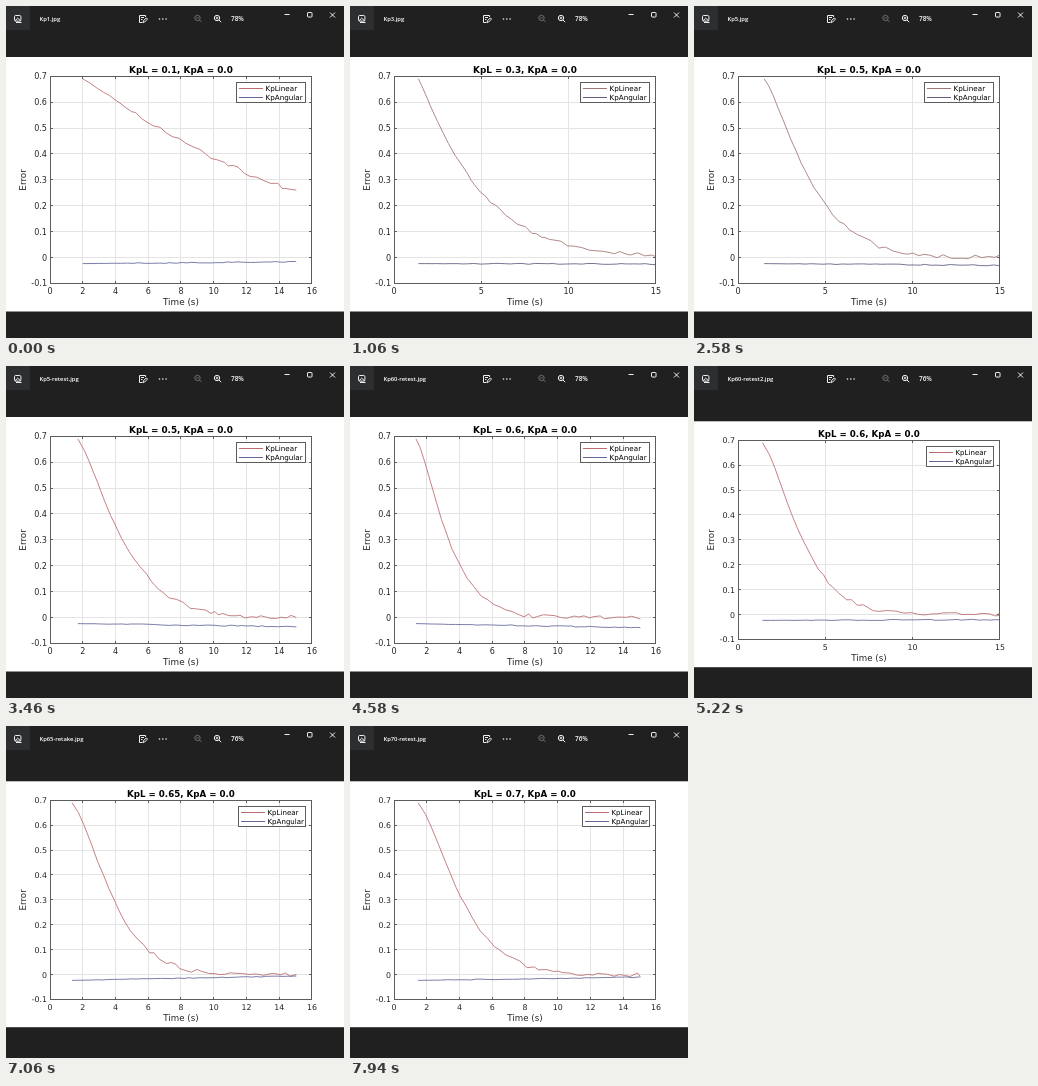
Write an HTML page that moves like this. It is 338 px wide and 332 px high and loops after 8000 ms.

```html
<!DOCTYPE html>
<html lang="en">
<head>
<meta charset="utf-8">
<title>Gain tuning plots</title>
<style>
  html, body { margin: 0; width: 100%; height: 100%; overflow: hidden; background: #202020; }
  svg { display: block; width: 338px; height: 332px; }
  .ui { font: 600 5.85px "Open Sans", sans-serif; fill: #fff; }
  .icon { fill: none; stroke: #f0f0f0; }
  .plot { font-family: "DejaVu Sans", sans-serif; fill: #262626; }
  .slide { visibility: hidden; }
  .slide.on { visibility: visible; }
  .grid, .axis, .key { fill: none; shape-rendering: crispEdges; }
  .grid { stroke: #e4e4e4; }
  .axis { stroke: #5c5c5c; }
  .line { fill: none; stroke-width: .85; stroke-linejoin: round; }
  .lin { stroke: #bb6c70; }
  .ang { stroke: #64679a; }
  .loading .lin { stroke: #a07773; }
  .loading .ang { stroke: #5c5f80; }
</style>
</head>
<body>
<svg id="stage" viewBox="0 0 338 332">
  <rect width="338" height="332" fill="#202020"/>
  <rect width="24" height="24" fill="#2d2e30"/>
  <g class="icon">
    <rect x="8.5" y="9.5" width="6.4" height="5.6" rx="1.2"/>
    <path d="M9 14.8l2.7-2.6 2.8 2.6M10 16.5h5.5"/>
    <path d="M139.5 11V9.5h-6v7h3M135 11.5h3M135 13.5h1.5M137 16.5l.4-1.7 2.9-2.9 1.2 1.2-2.9 2.9z"/>
    <g stroke="#6c6c6c"><circle cx="191.5" cy="12" r="2.7"/><path d="M193.5 14l2.2 2.2M190.2 12h2.6"/></g>
    <circle cx="211" cy="12" r="2.7"/><path d="M213 14l2.2 2.2M209.7 12h2.6M211 10.7v2.6"/>
    <path d="M278.5 8.5h5M324 6.5l5 5M329 6.5l-5 5"/>
    <rect x="301.5" y="6.5" width="4.5" height="4.5" rx=".6"/>
  </g>
  <g fill="#f0f0f0"><circle cx="153.5" cy="13" r=".8"/><circle cx="156.8" cy="13" r=".8"/><circle cx="160.1" cy="13" r=".8"/></g>
</svg>
<script>
const LOOP = 8000, SETTLE = 160, LEFT = 44, RIGHT = 305.9;

// Two picture sizes: the second is fitted a little smaller in the window.
const BIG = { zoom: '78%', top: 51, bottom: 305.5, y0: 70.2, dy: 25.92, font: 1, legend: [230, 76, 70, 21] };
const SMALL = { zoom: '76%', top: 55.3, bottom: 301.2, y0: 74.2, dy: 24.92, font: .98, legend: [232, 80, 68, 21] };

// name, time shown, first sample (s), decay rate, decay bend, last angular error, picture size, last tick
const slides = [
  ['Kp1', 0, 2, .0766, 1.1, -.016, BIG, 16],
  ['Kp2', 500, 1.6, .17, 1.1, -.02, BIG, 16],
  ['Kp3', 980, 1.4, .28, 1.1, -.025, BIG, 15],
  ['Kp4', 1620, 1.34, .378, 1.07, -.035, BIG, 16],
  ['Kp4-retest', 2100, 1.4, .38, 1.1, -.03, BIG, 16],
  ['Kp5', 2580, 1.5, .33, 1.3, -.03, BIG, 15],
  ['Kp5-retest', 3220, 1.7, .317, 1.31, -.035, BIG, 16],
  ['Kp60', 3860, 1.4, .42, 1.35, -.035, BIG, 15],
  ['Kp60-retest', 4420, 1.34, .437, 1.36, -.039, BIG, 16],
  ['Kp60-retest2', 4980, 1.4, .38, 1.4, -.02, SMALL, 15],
  ['Kp60-retest3', 5540, 1.4, .37, 1.4, -.02, SMALL, 16],
  ['Kp65', 6020, 1.47, .328, 1.46, -.014, SMALL, 16],
  ['Kp65-retake', 6580, 1.34, .342, 1.42, -.005, SMALL, 16],
  ['Kp70', 7140, 1.47, .325, 1.4, -.015, BIG, 16],
  ['Kp70-retest', 7780, 1.47, .325, 1.4, -.01, SMALL, 16]
].map(([name, at, from, rate, bend, drift, fit, max]) => ({
  name, at, from, rate, bend, drift, fit, max,
  to: Math.min(15.05, max - .05),
  gain: Number('0.' + name.match(/\d+/)[0])
}));

function random(seed) {
  let s = seed * 7919 + 17;
  return () => (s = (s * 16807) % 2147483647) / 2147483647;
}

// Samples an error function at uneven times, with sensor noise that grows in.
function trace({ from, to, fit, max }, error, noise, seed) {
  const rnd = random(seed), pts = [];
  for (let t = from; ; t = Math.min(to, t + .22 + rnd() * .26)) {
    const e = error(t - from) + noise * (2 * rnd() - 1) * Math.min(1, (t - from) / 4);
    pts.push([LEFT + (RIGHT - LEFT) * t / max, fit.y0 + (.7 - e) * 10 * fit.dy]);
    if (t >= to) return pts.join(' ');
  }
}

function add(parent, tag, attrs, text) {
  const el = document.createElementNS('http://www.w3.org/2000/svg', tag);
  for (const key in attrs) el.setAttribute(key, attrs[key]);
  if (text) el.textContent = text;
  return parent.appendChild(el);
}

function label(parent, text, x, y, size, anchor = 'middle', more = {}) {
  add(parent, 'text', { x, y, 'font-size': size, 'text-anchor': anchor, ...more }, text);
}

const crisp = v => Math.floor(v) + .5;

function drawAxes(plot, { fit, max, gain }) {
  const f = fit.font, floor = fit.y0 + 8 * fit.dy, mid = (LEFT + RIGHT) / 2;
  const [l, r, top, bottom] = [LEFT, RIGHT, fit.y0, floor].map(crisp);
  let grid = '', ticks = '';
  for (let t = 0; t <= max; t += max === 15 ? 5 : 2) {
    const x = LEFT + (RIGHT - LEFT) * t / max, cx = crisp(x);
    grid += `M${cx} ${top}V${bottom}`;
    ticks += `M${cx} ${bottom}v-2.5M${cx} ${top}v2.5`;
    label(plot, String(t), x, floor + 10.9, 8.06 * f);
  }
  for (let n = 0; n <= 8; n++) {
    const y = fit.y0 + n * fit.dy, cy = crisp(y);
    grid += `M${l} ${cy}H${r}`;
    ticks += `M${l} ${cy}h2.5M${r} ${cy}h-2.5`;
    label(plot, n === 7 ? '0' : ((7 - n) / 10).toFixed(1), 41, y + 2.9, 8.06 * f, 'end');
  }
  add(plot, 'path', { class: 'grid', d: grid });
  add(plot, 'path', { class: 'axis', d: `${ticks}M${l} ${top}H${r}V${bottom}H${l}z` });
  label(plot, `KpL = ${gain}, KpA = 0.0`, mid, fit.y0 - 3.5, 8.86 * f, 'middle', { 'font-weight': 700, fill: '#000' });
  label(plot, 'Time (s)', mid, floor + 21.9, 8.86 * f);
  label(plot, 'Error', 0, 0, 8.86 * f, 'middle', { transform: `translate(20.3 ${(fit.y0 + floor) / 2}) rotate(-90)` });
}

function drawLegend(plot, { legend: [x, y, width, height], font }) {
  add(plot, 'rect', { class: 'axis', x: x + .5, y: y + .5, width: width - 1, height: height - 1, style: 'fill:#fff' });
  [['lin', 'KpLinear'], ['ang', 'KpAngular']].forEach(([cls, text], row) => {
    const ly = y + 6.5 + row * 9;
    add(plot, 'path', { class: 'key ' + cls, d: `M${x + 3} ${ly}h24` });
    label(plot, text, x + 29.5, ly + 2.4, 7.2 * font, 'start', { fill: '#000' });
  });
}

function build(slide, i) {
  const { name, fit, rate, bend, drift, from, to } = slide;
  const g = add(stage, 'g', { class: 'slide' });
  add(g, 'text', { class: 'ui', x: 33.4, y: 15 }, name + '.jpg');
  add(g, 'text', { class: 'ui', x: 225, y: 15.3, style: 'font-size:6.4px' }, fit.zoom);
  add(g, 'rect', { y: fit.top, width: 338, height: fit.bottom - fit.top, fill: '#fff' });

  const plot = add(g, 'g', { class: 'plot' });
  drawAxes(plot, slide);
  const linear = s => .69 * Math.exp(-Math.pow(rate * s, bend));
  const angular = s => -.023 + (drift + .023) * s / (to - from);
  add(plot, 'polyline', { class: 'line lin', points: trace(slide, linear, .008, i + 1) });
  add(plot, 'polyline', { class: 'line ang', points: trace(slide, angular, .002, i + 40) });
  drawLegend(plot, fit);
  return g;
}

const stage = document.getElementById('stage');
const views = slides.map(build);
const start = performance.now();

function draw(now) {
  const t = Math.max(0, now - start) % LOOP;
  const current = slides.findLastIndex(s => s.at <= t);
  views.forEach((view, i) => {
    view.classList.toggle('on', i === current);
    view.classList.toggle('loading', i > 0 && t < slides[i].at + SETTLE);
  });
  requestAnimationFrame(draw);
}
draw(start);
</script>
</body>
</html>
```
